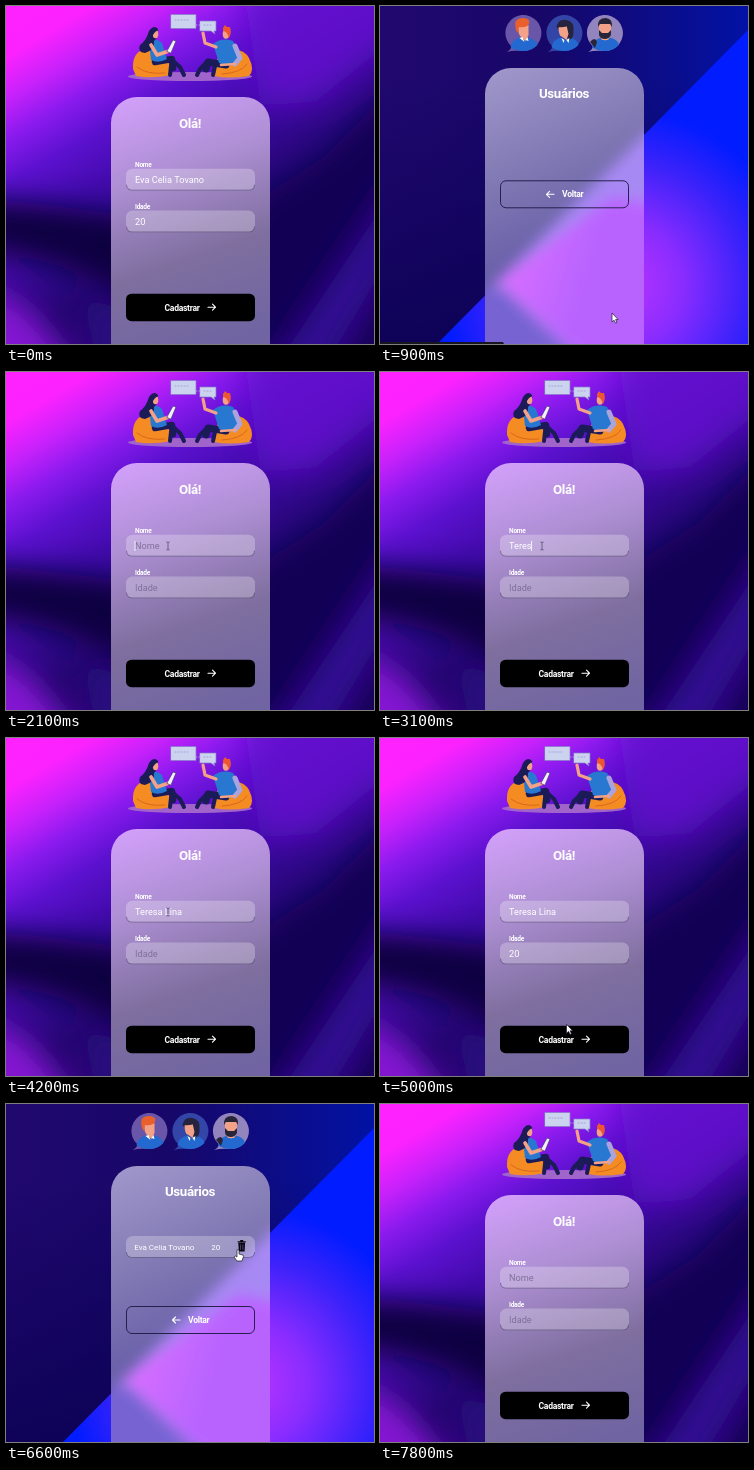
Write an HTML page that moves like this. It is 368 px wide and 338 px high and loops after 7.9 s.

```html
<!DOCTYPE html>
<html lang="pt-BR">
<head>
<meta charset="utf-8">
<title>Cadastro</title>
<style>
html, body { margin: 0; width: 100%; height: 100%; overflow: hidden; background: #14054f; }
svg { display: block; width: 368px; height: 338px; }
text { font-family: Roboto, Arial, sans-serif; fill: #fff; }
.title { font-size: 13.3px; font-weight: 700; letter-spacing: -.35px; text-anchor: middle; }
.label { font-size: 6.6px; font-weight: 700; letter-spacing: -.28px; }
.value { font-size: 9.2px; }
.hint { fill: #806f9b; }
.button { font-size: 8.6px; font-weight: 700; letter-spacing: -.3px; }
.row text { font-size: 8px; text-anchor: middle; }
.field { fill: #fff; fill-opacity: .25; }
.shade { fill: none; stroke: #2c1f4c; stroke-opacity: .45; stroke-width: 1; }
.arrow { fill: none; stroke: #fff; stroke-width: 1.1; stroke-linecap: round; stroke-linejoin: round; }
</style>
</head>
<body>
<svg viewBox="0 0 368 338">
  <defs>
    <filter id="soft" x="-60%" y="-60%" width="220%" height="220%"><feGaussianBlur stdDeviation="15"/></filter>
    <filter id="mist" x="-50%" y="-50%" width="200%" height="200%"><feGaussianBlur stdDeviation="7"/></filter>
    <linearGradient id="neon" gradientUnits="userSpaceOnUse" x1="0" y1="0" x2="150" y2="255">
      <stop offset="0" stop-color="#ff22ff"/><stop offset=".15" stop-color="#fb22ff"/>
      <stop offset=".27" stop-color="#c821fb"/><stop offset=".39" stop-color="#8a1aee"/>
      <stop offset=".52" stop-color="#5c11cf"/><stop offset=".68" stop-color="#430bae"/>
      <stop offset="1" stop-color="#22066f"/>
    </linearGradient>
    <linearGradient id="glass" gradientUnits="userSpaceOnUse" x1="130" y1="92" x2="215" y2="338">
      <stop offset="0" stop-color="#d09ff8"/><stop offset=".3" stop-color="#ae8fd4"/>
      <stop offset=".65" stop-color="#7f6f9f"/><stop offset="1" stop-color="#7065a2"/>
    </linearGradient>
    <linearGradient id="night" x1="0" y1="0" x2="1" y2="0">
      <stop offset="0" stop-color="#21086f"/><stop offset=".45" stop-color="#170768"/>
      <stop offset="1" stop-color="#0212a4"/>
    </linearGradient>
    <linearGradient id="dusk" x1="0" y1="0" x2="0" y2="1">
      <stop offset=".2" stop-color="#080050" stop-opacity="0"/><stop offset="1" stop-color="#080050" stop-opacity=".75"/>
    </linearGradient>
    <radialGradient id="beam" gradientUnits="userSpaceOnUse" cx="240" cy="280" r="178">
      <stop offset="0" stop-color="#b935ff"/><stop offset=".35" stop-color="#8a2cff"/>
      <stop offset=".7" stop-color="#3c22fa"/><stop offset="1" stop-color="#001cff"/>
    </radialGradient>
    <linearGradient id="frost" x1="0" y1="0" x2=".25" y2="1">
      <stop offset="0" stop-color="#a198cc"/><stop offset=".4" stop-color="#8179b3"/>
      <stop offset="1" stop-color="#5349a0"/>
    </linearGradient>
    <linearGradient id="blush" gradientUnits="userSpaceOnUse" x1="190" y1="0" x2="275" y2="25">
      <stop offset="0" stop-color="#dd70ff"/><stop offset="1" stop-color="#b964ff"/>
    </linearGradient>
    <clipPath id="pane"><path d="M105 340V88a26 26 0 0 1 26-26h107a26 26 0 0 1 26 26v252z"/></clipPath>
    <g id="bin">
      <path d="M-4-4.2h8M-1.5-5.3h3" stroke="#0b0714" stroke-width="1.3"/>
      <path d="M-3.4-3.2h6.8L2.9 5.5h-5.8z" fill="#0b0714"/>
      <path d="M-1.2-1.5v5.3M1.2-1.5v5.3" stroke="#6e6690" stroke-width=".6"/>
    </g>
    <path id="bubble" d="M-12 13.5A18 18 0 1 1 0 18Q-10 17-17 19Q-13 17-12 13.5z"/>
    <path id="torso" d="M-13 14Q-12 6-3 4.5L0 8L4 4.5Q13 6 14 12Q8 18 0 18Q-8 18-13 14z" fill="#2369cf"/>
  </defs>

  <g id="form">
    <path fill="url(#neon)" d="M0 0h368v338H0z"/>
    <g filter="url(#soft)">
      <path fill="#6512cd" d="M235-40H410V15L310 95L255 100z" opacity=".8"/>
      <path fill="#11034f" d="M400 70V175L290 345H235V205L320 150z" opacity=".85"/>
      <path fill="#3a0ba0" d="M400 165V225L310 375H260z" opacity=".8"/>
      <path fill="#0c0347" d="M400 240V380H325z" opacity=".7"/>
      <path fill="#0b0340" d="M-40 192Q50 198 135 212V300Q70 252-40 243z"/>
      <path fill="#8418d2" d="M-40 278Q30 285 72 375H-40z"/>
      <path fill="#2a0880" d="M75 290L125 305V370H95z"/>
    </g>
    <ellipse cx="184" cy="70.5" rx="62" ry="4.5" fill="#a064ca"/>
    <g stroke-linecap="round" stroke-linejoin="round" fill="none">
      <path fill="#f58b23" d="M127 63Q126 47 138 43Q152 41 160 53Q167 62 165 69Q146 73 130 70z"/>
      <path fill="#f58b23" d="M207 68Q208 50 222 45Q237 41 243 52Q249 64 243 70Q222 73 208 70z"/>
      <path stroke="#d9681c" stroke-width="1" d="M131 61q10 8 28 6M241 58q-6 9-25 10"/>
      <path stroke="#1b1b58" stroke-width="6.5" d="M149 56L166 53L167 62"/>
      <path stroke="#1b1b58" stroke-width="4" d="M166 54L174 61L178 69M165 60L164 69"/>
      <path fill="#2878d2" d="M143 36Q150 31 156 37L161 53Q152 58 145 54z"/>
      <path fill="#1b1b58" d="M143 25Q148 18 152 23Q153 31 148 35Q149 44 139 47Q131 46 134 39Q140 35 143 25z"/>
      <path stroke="#f3a187" stroke-width="3.6" d="M145 39L151 49L163 45"/>
      <ellipse fill="#f3a187" cx="149.5" cy="28" rx="2.8" ry="4.2"/>
      <path fill="#1b1b58" d="M143 27Q146 19 152 24Q148 26 146 31z"/>
      <path fill="#f4effc" stroke="#453579" stroke-width=".7" d="M161 45L167 34L170 35L165 47z"/>
      <path stroke="#1b1b58" stroke-width="7" d="M220 59L202 56L200 63"/>
      <path stroke="#1b1b58" stroke-width="4" d="M202 55L194 63L191 69M209 60L207 69"/>
      <path fill="#2878d2" d="M207 38Q216 31 227 35Q234 45 231 57Q222 62 213 57z"/>
      <path stroke="#f3a187" stroke-width="3.2" d="M210 41L199 37L197 27"/>
      <path stroke="#aaa3dc" stroke-width="5" d="M229 40L234 52L229 58"/>
      <path stroke="#f3a187" stroke-width="2.6" d="M229 58L215 59"/>
      <ellipse fill="#f3a187" cx="220" cy="28" rx="3.3" ry="4.8"/>
      <path fill="#ed5632" d="M217 22L219 19L221 21L224 21Q226 27 223 32Q221 25 217 25z"/>
      <path fill="#cbd3ef" stroke="#847bc8" stroke-width=".7" d="M165 8.5h25v14h-25zM194 15h16v10h-2l1 3l-4-3h-11z"/>
      <path stroke="#a79fda" d="M190 19h4M169 14h15M198 19h8" stroke-dasharray="1 2"/>
    </g>
    <path fill="url(#glass)" d="M105 340V117a26 26 0 0 1 26-26h107a26 26 0 0 1 26 26v223z"/>
    <text class="title" x="184" y="122">Olá!</text>
    <text class="label" x="129" y="161">Nome</text>
    <text class="label" x="129" y="203">Idade</text>
    <g id="fields"></g>
    <text class="value" id="name" x="129" y="177.2"></text>
    <text class="value" id="age" x="129" y="218.8"></text>
    <path id="caret" d="M0 0v10" stroke="#fff" stroke-width=".8"/>
    <rect x="120" y="287.7" width="129" height="27.5" rx="5.5"/>
    <text class="button" x="158.5" y="304.5">Cadastrar</text>
    <path class="arrow" d="M202 301.2h7.5m-3-3l3 3l-3 3"/>
  </g>

  <g id="users">
    <path fill="url(#night)" d="M0 0h368v338H0z"/>
    <path fill="url(#dusk)" d="M0 0h368v338H0z"/>
    <path fill="url(#beam)" d="M368 24V338H57z"/>
    <g clip-path="url(#pane)">
      <path fill="url(#frost)" d="M105 62h159v278H105z"/>
      <g filter="url(#mist)">
        <path fill="#a789f4" d="M285 108V360H80V312z"/>
        <path fill="#7764d2" d="M95 285L122 282L195 350H85z"/>
        <path fill="url(#blush)" d="M118 275L232 190L285 200V365H215z"/>
      </g>
    </g>
    <g transform="translate(143.5 27)">
      <use href="#bubble" fill="#6a56a8"/><use href="#torso"/>
      <path fill="#f3a187" d="M-5-8H5V2L2 8L-2 4Q-6 2-5-8z"/>
      <path fill="#e9602c" d="M-8-6Q-10-15 0-15Q9-14 4-7Q-1-5-5-6L-5 0Q-8-2-8-6z"/>
      <path fill="#fff" d="M-4 5L-1 4L1 9zM2 7L4 4L5 8z"/>
    </g>
    <g transform="translate(184.5 27)">
      <use href="#bubble" fill="#3445a8"/><use href="#torso"/>
      <path fill="#25233d" d="M-8-6Q-6-15 2-13Q10-12 9-1Q9 5 5 7L-1 2z"/>
      <path fill="#f3a187" d="M-6-7L2-8L4 1L2 7L-2 4Q-6 4-6-7z"/>
      <path fill="#25233d" d="M-8-6Q1-15 5-9Q3-5-8-6z"/>
      <path fill="#fff" d="M-3 5L0 7L-1 10zM2 7L5 5L4 10z"/>
    </g>
    <g transform="translate(225 27)">
      <use href="#bubble" fill="#9285bd"/><use href="#torso"/>
      <path fill="#f3a187" d="M-6-9H6V2L3 7H-3L-6 2z"/>
      <path fill="#292538" d="M-7-6Q-8-15 1-15Q8-14 7-6L5-9H-5zM-6-3L-3 0H3L6-3V2Q4 6 0 6Q-5 6-6 2z"/>
      <path fill="#292538" d="M-15 9Q-10 3-8 9L-10 15z"/>
    </g>
    <text class="title" x="184" y="92">Usuários</text>
    <g id="list"></g>
    <g id="back">
      <rect x="120.5" y=".5" width="128" height="27" rx="5.5" fill="none" stroke="#26204f" stroke-width="1"/>
      <path class="arrow" d="M174 14h-7.5m3-3l-3 3l3 3"/>
      <text class="button" x="182" y="17">Voltar</text>
    </g>
    <path id="status" d="M0 336h123l1 2H0z" fill="#17151d"/>
  </g>

  <g id="cursor">
    <path id="point" d="M0 0V9L2.1 7.2L3.6 10.2L5 9.5L3.6 6.6H6.2z" fill="#fff" stroke="#1b172b" stroke-width=".7"/>
    <path id="hand" d="M-1 0Q0-1 1 0V4L5 5Q6 6 5 8L4 11H-1L-4 7Q-3 5-1 7z" fill="#fff" stroke="#1b172b" stroke-width=".7"/>
    <path id="beamBar" d="M-1.6-4Q0-4 0-3Q0-4 1.6-4M0-3V3M-1.6 4Q0 4 0 3Q0 4 1.6 4" fill="none" stroke="#282039" stroke-opacity=".65" stroke-width=".8"/>
  </g>
</svg>
<script>
const LOOP = 7900, STEP = 100;
const FIRST = "Eva Celia Tovano", SECOND = "Teresa Lina";
const $ = id => document.getElementById(id);
const show = (id, on) => $(id).style.display = on ? "" : "none";
const within = (t, a, b) => t >= a && t < b;

const box = y => `<rect class="field" x="120" y="${y}" width="129" height="22" rx="6.5"/>
  <path class="shade" d="M120.5 ${y + 16}q0 5.5 6 5.5h116q6 0 6-5.5"/>`;
$("fields").innerHTML = box(162.7) + box(204.5);

const row = (name, y, nameX, ageX, binX) => `<g class="row">${box(y)}
  <text x="${nameX}" y="${y + 13.5}">${name}</text>
  <text x="${ageX}" y="${y + 13.5}">20</text>
  <use href="#bin" x="${binX}" y="${y + 10}"/></g>`;
$("list").innerHTML = row(FIRST, 132, 158.3, 209.7, 235.7) + row(SECOND, 159, 151.7, 199.7, 232.5);
const rows = $("list").children;

// time, x, y, pointer shape
const path = [
  [300, 185, 245, "point"], [600, 232, 307, "hand"], [900, 232, 307, "point"],
  [1100, 232, 307, "point"], [1500, 201, 216, "hand"], [1800, 201, 216, "point"],
  [2000, 162, 174, "beamBar"], [4700, 162, 174, "point"], [5100, 191, 307, "hand"],
  [5400, 191, 307, "point"], [5700, 191, 307, "point"], [6200, 232, 167, "hand"],
  [6400, 232, 167, "hand"], [6600, 232, 146, "hand"], [6800, 232, 146, "point"],
  [7000, 201, 188, "hand"], [7200, 201, 188, "point"], [7500, 290, 265, "point"]
];

function moveCursor(t) {
  const i = path.findIndex((p, n) => n + 1 < path.length && within(t, p[0], path[n + 1][0]));
  show("cursor", i >= 0);
  if (i < 0) return;
  const [a, x, y, shape] = path[i], [b, nx, ny] = path[i + 1];
  const u = (t - a) / (b - a), k = u * u * (3 - 2 * u);
  $("cursor").setAttribute("transform", `translate(${x + (nx - x) * k} ${y + (ny - y) * k})`);
  for (const id of ["point", "hand", "beamBar"]) show(id, id === shape);
}

function fill(id, text, hint) {
  $(id).textContent = text || hint;
  $(id).classList.toggle("hint", !text);
}

function drawForm(t) {
  const typed = (text, start, pace) => text.slice(0, Math.max(0, Math.floor((t - start) / pace)));
  const filled = t < 900, typing = within(t, 1800, 5400);
  const name = filled ? FIRST : typing ? typed(SECOND, 2300, 150) : "";
  const age = filled ? "20" : typing ? typed("20", 4400, 100) : "";
  fill("name", name, "Nome");
  fill("age", age, "Idade");
  const inAge = t >= 4300;
  const focused = within(t, 2100, 4000) || within(t, 4300, 4900);
  show("caret", focused);
  if (focused) {
    const text = inAge ? age : name;
    const width = text ? $(inAge ? "age" : "name").getComputedTextLength() : 0;
    $("caret").setAttribute("transform", `translate(${129 + width} ${inAge ? 211 : 169})`);
  }
}

function drawUsers(t) {
  const first = within(t, 1000, 1800) || within(t, 5500, 6800);
  const second = within(t, 5500, 6400);
  rows[0].style.display = first ? "" : "none";
  rows[1].style.display = second ? "" : "none";
  $("back").setAttribute("transform", `translate(0 ${174.3 + 27.7 * (first + second)})`);
  show("status", within(t, 900, 1000));
}

function draw() {
  const t = Math.floor(performance.now() % LOOP / STEP) * STEP;
  const users = within(t, 900, 1800) || within(t, 5400, 7200);
  show("form", !users);
  show("users", users);
  if (users) drawUsers(t); else drawForm(t);
  moveCursor(t);
  requestAnimationFrame(draw);
}
draw();
</script>
</body>
</html>
```
